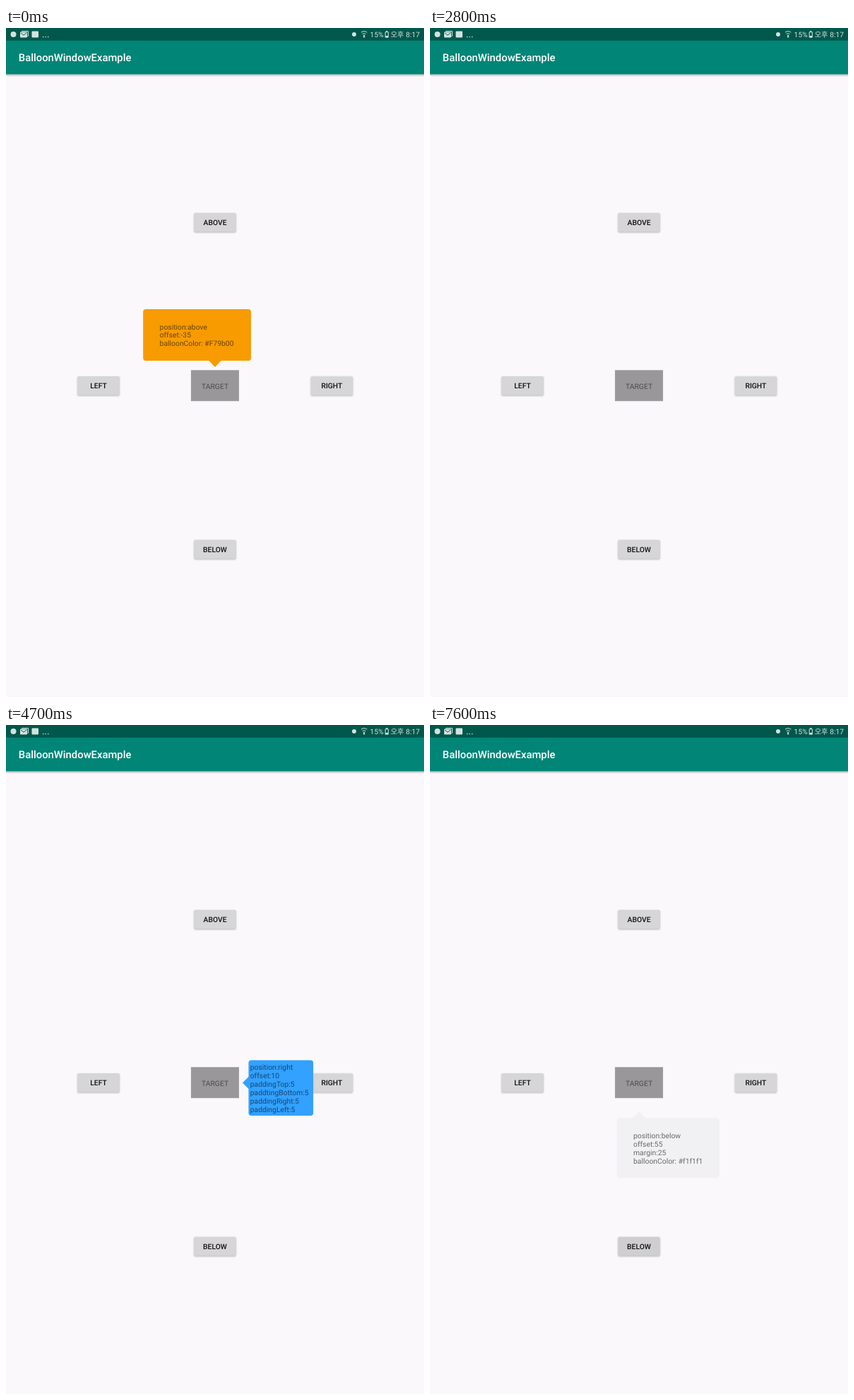
These frames come from a looping animation (592 by 947 pixels, 8 s). An HTML page:

```html
<!DOCTYPE html>
<html lang="en">
<head>
<meta charset="utf-8">
<title>Balloon window</title>
<style>
  html, body { margin: 0; height: 100%; overflow: hidden; background: #faf8fb; }
  svg { display: block; width: 100%; height: 100%; }
  text { font: 10.36px Roboto, "Noto Sans CJK KR", sans-serif; text-rendering: geometricPrecision; }

  .status { fill: #d3e2df; }
  .status text { font-size: 10.3px; }
  .line { fill: none; stroke: #d3e2df; }
  .title { font-size: 14.8px; font-weight: 500; fill: #fff; }

  .btn text { font-weight: 500; text-anchor: middle; fill: #111; }
  .btn rect {
    x: -29.6px; y: -13.3px; width: 59.2px; height: 26.8px; rx: 1.5px;
    fill: #d6d5d8;
    filter: drop-shadow(0 1px .8px rgba(0, 0, 0, .28));
  }
  .balloon text { fill: #000; fill-opacity: .56; }

  .above, .right, .below, .press-right rect, .press-below rect {
    animation: 8s step-end infinite;
  }
  .above { animation-name: fade-above; }
  .right { transform-origin: 335px 506.5px; animation-name: grow-right, fade-right; }
  .below { transform-origin: 296px 547px; animation-name: grow-below; }
  .press-right rect { animation-name: press-right; }
  .press-below rect { animation-name: press-below; }

  @keyframes fade-above {
    0% { opacity: 1; }
    33.75% { opacity: .36; }
    35%, 100% { opacity: 0; }
  }
  @keyframes grow-right {
    0% { transform: scale(0); }
    52.5% { transform: scale(.01); }
    53.75% { transform: scale(.333); }
    55% { transform: scale(.826); }
    56.25%, 100% { transform: scale(1); }
  }
  @keyframes fade-right {
    0% { opacity: 1; }
    73.75% { opacity: .94; }
    75%, 100% { opacity: 0; }
  }
  @keyframes grow-below {
    0% { transform: scale(0); }
    91.25% { transform: scale(.01); }
    92.5% { transform: scale(.333); }
    93.75% { transform: scale(.826); }
    95%, 100% { transform: scale(1); }
  }
  @keyframes press-right {
    0%, 58.75%, 100% { fill: #d6d5d8; filter: drop-shadow(0 1px .8px rgba(0, 0, 0, .28)); }
    51.25% { fill: #d5d4d7; filter: drop-shadow(0 3.5px 1.8px rgba(0, 0, 0, .3)); }
    52.5% { fill: #cfced1; filter: drop-shadow(0 3.5px 1.8px rgba(0, 0, 0, .3)); }
    53.75% { fill: #c9c9cb; filter: drop-shadow(0 2.5px 1.4px rgba(0, 0, 0, .3)); }
    55% { fill: #c9c9cb; filter: drop-shadow(0 1px .8px rgba(0, 0, 0, .28)); }
    56.25% { fill: #cfced1; filter: drop-shadow(0 1px .8px rgba(0, 0, 0, .28)); }
    57.5% { fill: #d3d2d5; filter: drop-shadow(0 1px .8px rgba(0, 0, 0, .28)); }
  }
  @keyframes press-below {
    0% { fill: #d6d5d8; filter: drop-shadow(0 1px .8px rgba(0, 0, 0, .28)); }
    90% { fill: #d3d2d5; filter: drop-shadow(0 3.5px 1.8px rgba(0, 0, 0, .3)); }
    91.25% { fill: #cfced1; filter: drop-shadow(0 3.5px 1.8px rgba(0, 0, 0, .3)); }
    92.5% { fill: #c9c9cb; filter: drop-shadow(0 2.5px 1.4px rgba(0, 0, 0, .3)); }
    93.75% { fill: #c9c9cb; filter: drop-shadow(0 1px .8px rgba(0, 0, 0, .28)); }
    95%, 100% { fill: #cfced1; filter: drop-shadow(0 1px .8px rgba(0, 0, 0, .28)); }
  }
</style>
</head>
<body>
<svg viewBox="0 0 592 947" preserveAspectRatio="none">
  <defs>
    <linearGradient id="shade" x2="0" y2="1">
      <stop offset="0" stop-opacity=".3"/>
      <stop offset="1" stop-opacity="0"/>
    </linearGradient>
  </defs>
  <rect width="592" height="947" fill="#faf8fb"/>

  <!-- app bar and status bar -->
  <rect y="65" width="592" height="4" fill="url(#shade)"/>
  <rect width="592" height="65.4" fill="#008577"/>
  <rect width="592" height="17.8" fill="#00574b"/>
  <text class="title" x="17.8" y="47">BalloonWindowExample</text>

  <g class="status">
    <circle cx="10.5" cy="9" r="4"/>
    <path class="line" d="M22.5 5.5v-1h9v7h-1"/>
    <rect x="20" y="5.5" width="10" height="8" rx="1"/>
    <path d="M21 7l4 3.2 4-3.2" fill="none" stroke="#00574b"/>
    <rect x="36.5" y="4.5" width="9.5" height="9" rx="1"/>
    <circle cx="52.7" cy="12.6" r=".8"/>
    <circle cx="56.2" cy="12.6" r=".8"/>
    <circle cx="59.7" cy="12.6" r=".8"/>

    <circle cx="493" cy="9" r="3"/>
    <path class="line" d="M503 6.2q4.2-3.2 8.4 0M504.8 8.6q2.4-1.8 4.8 0"/>
    <path d="M506.2 10h2v3.5h-2z"/>
    <text x="515.6" y="12.9">15%</text>
    <path class="line" d="M537.2 5.8h4.2v7.4h-4.2z"/>
    <path d="M538.2 4h2.2v1.5h-2.2zM537.5 11h3.6v2h-3.6z"/>
    <text x="586" y="12.9" text-anchor="end">오후 8:17</text>
  </g>

  <!-- buttons -->
  <g class="btn" transform="translate(296 275)"><rect/><text y="3.8">ABOVE</text></g>
  <g class="btn" transform="translate(131 506.3)"><rect/><text y="3.8">LEFT</text></g>
  <g class="btn press-right" transform="translate(461.4 506.3)"><rect/><text y="3.8">RIGHT</text></g>
  <g class="btn press-below" transform="translate(296 737.8)"><rect/><text y="3.8">BELOW</text></g>

  <rect x="262.3" y="484.8" width="67.4" height="43" fill="#9a979b" stroke="#918e92" stroke-width=".7"/>
  <text x="296" y="510.6" text-anchor="middle" fill="#4c4a4d">TARGET</text>

  <!-- balloons -->
  <g class="balloon above">
    <path d="M286.5 470h19l-9.5 10z" fill="#f79b00"/>
    <rect x="194.2" y="398" width="152.8" height="73" rx="4" fill="#f79b00"/>
    <text y="426.5">
      <tspan x="217.6">position:above</tspan>
      <tspan x="217.6" dy="11.9">offset:-35</tspan>
      <tspan x="217.6" dy="11.9">balloonColor: #F79b00</tspan>
    </text>
  </g>

  <g class="balloon right">
    <path d="M344.5 497v19l-9.5-9.5z" fill="#32a1ff"/>
    <rect x="343.5" y="474.5" width="91.7" height="78.5" rx="4" fill="#32a1ff"/>
    <text y="488.2">
      <tspan x="345.7">position:right</tspan>
      <tspan x="345.7" dy="11.9">offset:10</tspan>
      <tspan x="345.7" dy="11.9">paddingTop:5</tspan>
      <tspan x="345.7" dy="11.9">paddtingBottom:5</tspan>
      <tspan x="345.7" dy="11.9">paddingRight:5</tspan>
      <tspan x="345.7" dy="11.9">paddingLeft:5</tspan>
    </text>
  </g>

  <g class="balloon below">
    <path d="M286.5 557h19l-9.5-10z" fill="#f1f0f2"/>
    <rect x="264.8" y="556.3" width="145" height="84.7" rx="4" fill="#f1f0f2"/>
    <text y="584.9">
      <tspan x="288">position:below</tspan>
      <tspan x="288" dy="11.9">offset:55</tspan>
      <tspan x="288" dy="11.9">margin:25</tspan>
      <tspan x="288" dy="11.9">balloonColor: #f1f1f1</tspan>
    </text>
  </g>
</svg>
</body>
</html>
```
